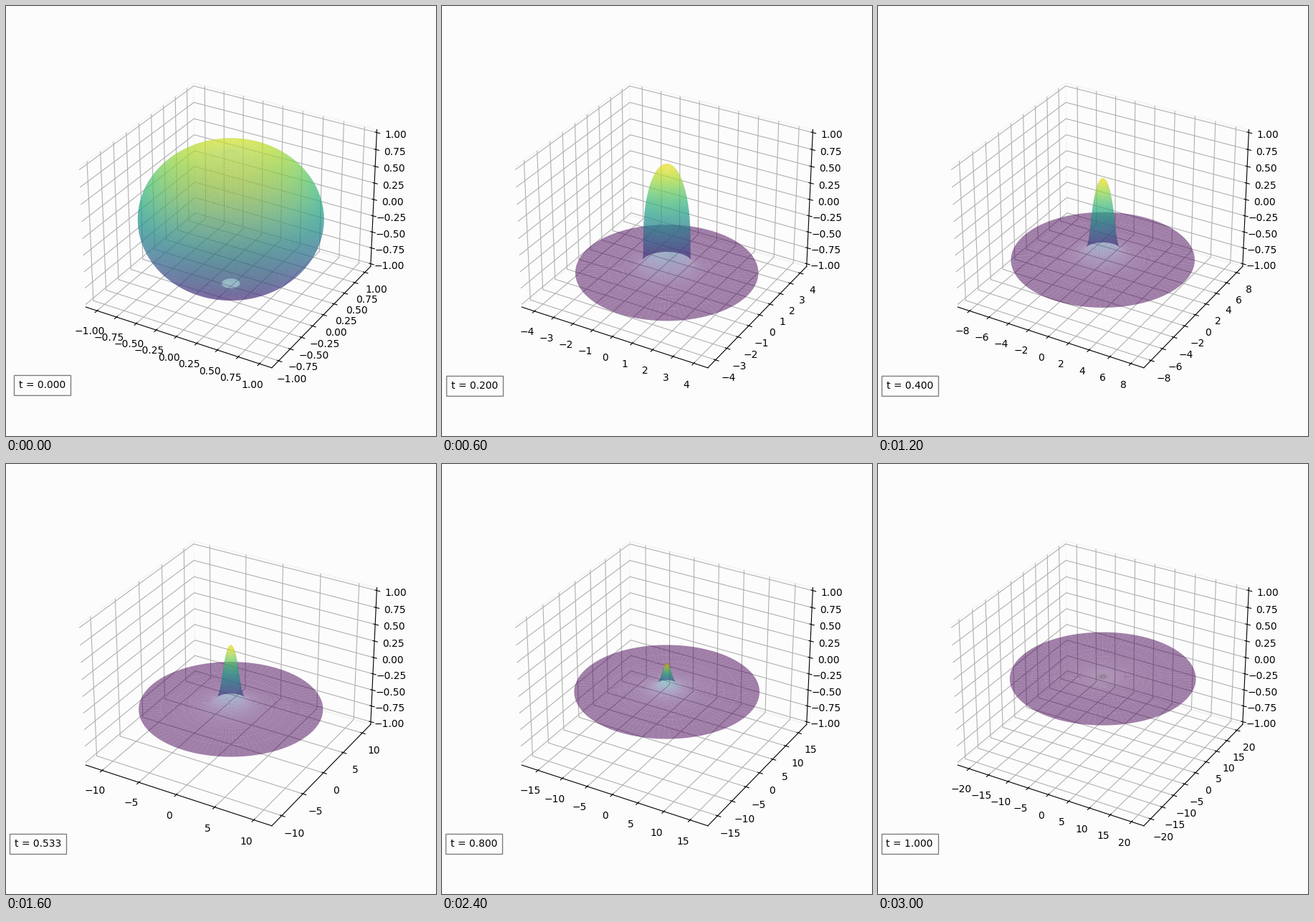
Recreate the animation shown at these times as a matplotlib script. Size 600 by 600 pixels, loop 3.2 s.

```python
import numpy as np
import matplotlib.pyplot as plt
from matplotlib.animation import FuncAnimation
from matplotlib.ticker import MaxNLocator
from mpl_toolkits.mplot3d.art3d import Poly3DCollection

FRAMES = 16
BACKGROUND = "#fcfcfc"

# Sphere with a small opening around the south pole, and its
# stereographic projection onto the equatorial plane.
theta, phi = np.meshgrid(np.linspace(0, np.pi - 0.1, 100),
                         np.linspace(0, 2 * np.pi, 100), indexing="ij")


def on_grid(radius, height):
    return np.stack([radius * np.cos(phi), radius * np.sin(phi), height], axis=-1)


sphere = on_grid(np.sin(theta), np.cos(theta))
plane = on_grid(np.tan(theta / 2), np.zeros_like(theta))
locator = MaxNLocator(9, steps=[1, 2, 2.5, 5, 10])


def quads(grid):
    corners = [grid[:-1, :-1], grid[1:, :-1], grid[1:, 1:], grid[:-1, 1:]]
    return np.stack(corners, axis=2).reshape(-1, 4, 3)


def set_axis(name, lo, hi):
    pad = (hi - lo) / 48
    ticks = locator.tick_values(lo, hi)
    ticks = ticks[(ticks >= lo - 1e-9) & (ticks <= hi + 1e-9)]
    ax.set(**{f"{name}ticks": ticks})
    ax.set(**{f"{name}lim": (lo - pad, hi + pad)})


fig = plt.figure(figsize=(6, 6), dpi=100, facecolor=BACKGROUND)
ax = fig.add_subplot(projection="3d", facecolor=BACKGROUND)
for axis in (ax.xaxis, ax.yaxis, ax.zaxis):
    axis.pane.set_facecolor(BACKGROUND)
    axis.pane.set_edgecolor("#ececec")

surface = Poly3DCollection(quads(sphere), cmap="viridis", alpha=0.5)
ax.add_collection3d(surface)
# Projected coordinates read as axes fractions make the label drift slightly.
label = ax.text(0.2, 0.2, 0, "", transform=ax.transAxes, ha="right",
                bbox=dict(facecolor=BACKGROUND, alpha=0.5, pad=5))
set_axis("z", -1, 1)


def update(i):
    t = i / (FRAMES - 1)
    grid = (1 - t) * sphere + t * plane
    faces = quads(grid)
    height = faces[:, :, 2].mean(axis=1)
    surface.set_verts(faces)
    surface.set_array(height)
    surface.set_clim(height.min(), height.max())
    for k, name in enumerate("xy"):
        lo, hi = grid[..., k].min(), grid[..., k].max()
        margin = 0.05 * (hi - lo)
        set_axis(name, lo - margin, hi + margin)
    label.set_text(f"t = {t:.3f}")
    return surface, label


anim = FuncAnimation(fig, update, frames=FRAMES, interval=200,
                     init_func=lambda: (), repeat=True, repeat_delay=0)
plt.show()
```
